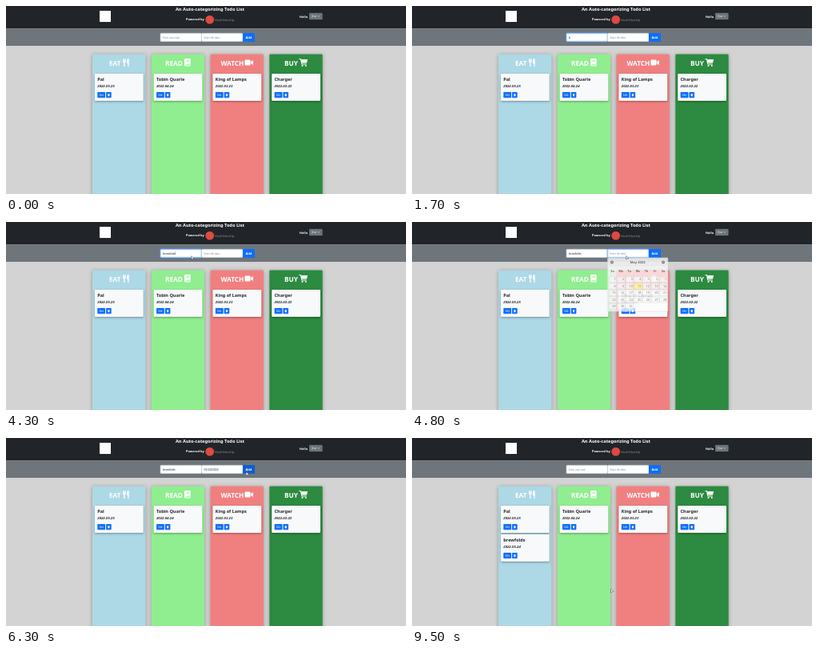
An HTML page with a canvas for the animation above (9900 ms loop, 500 px wide and 236 px high).

```html
<!DOCTYPE html>
<html lang="en">
<head>
<meta charset="utf-8">
<title>Todo list</title>
<style>
html, body { margin: 0; width: 100%; height: 100%; overflow: hidden; background: #d3d3d3; }
canvas { display: block; width: 500px; height: 236px; }
</style>
</head>
<body>
<canvas id="stage"></canvas>
<script>
const W = 500, H = 236, LOOP = 9900;
const FONT = '"Noto Sans", "Open Sans", sans-serif';
const BLUE = '#0d6efd', INK = '#212529';
const canvas = document.getElementById('stage');
const ctx = canvas.getContext('2d');
const ratio = window.devicePixelRatio || 1;
canvas.width = W * ratio;
canvas.height = H * ratio;

const TASK = 'brewfolds';
const KEY_TIMES = [1700, 1900, 2000, 2200, 2700, 2800, 2900, 3400, 3500];
const OPEN = 4550, PICK = 5800, RELOAD = 8600;

const columns = [
  { title: 'EAT', x: 108, tx: 129, color: '#add8e6', icon: utensils, ix: 146, name: 'Pal', date: '2022-05-25' },
  { title: 'READ', x: 181.7, tx: 199, color: '#90ee90', icon: book, ix: 223, name: 'Tobin Quarle', date: '2022-04-24' },
  { title: 'WATCH', x: 255.5, tx: 268.5, color: '#f08080', icon: camera, ix: 298.5, name: 'King of Lamps', date: '2022-03-23' },
  { title: 'BUY', x: 329.3, tx: 348, color: '#2c8b40', icon: cart, ix: 366.5, name: 'Charger', date: '2022-02-22' }
];

// Cursor path: time, x, y
const path = [
  [4300, 232, 43], [4550, 268, 42], [4900, 268, 43], [5450, 276, 98],
  [5850, 276, 98], [6250, 301, 42], [8900, 301, 42], [9500, 249, 190]
];

const clamp = v => Math.max(0, Math.min(1, v));
const ease = v => 0.5 - Math.cos(Math.PI * clamp(v)) / 2;

function rect(x, y, w, h, fill, r = 0, stroke) {
  ctx.beginPath();
  ctx.roundRect(x, y, w, h, r);
  ctx.fillStyle = fill;
  ctx.fill();
  if (stroke) {
    ctx.strokeStyle = stroke;
    ctx.lineWidth = 0.5;
    ctx.stroke();
  }
}

function shadowed(blur, color, dy, draw) {
  ctx.save();
  ctx.shadowBlur = blur * ratio;
  ctx.shadowColor = color;
  ctx.shadowOffsetY = dy * ratio;
  draw();
  ctx.restore();
}

function text(str, x, y, size, color, style = '400', align = 'left') {
  ctx.font = `${style} ${size}px ${FONT}`;
  ctx.fillStyle = color;
  ctx.textAlign = align;
  ctx.fillText(str, x, y);
}

function shape(points, fill) {
  ctx.beginPath();
  points.forEach(([x, y]) => ctx.lineTo(x, y));
  ctx.closePath();
  ctx.fillStyle = fill;
  ctx.fill();
}

function disc(x, y, r, fill) {
  ctx.beginPath();
  ctx.arc(x, y, r, 0, Math.PI * 2);
  ctx.fillStyle = fill;
  ctx.fill();
}

function utensils() {
  for (let i = 0; i < 3; i++) rect(i * 1.4, 0, 0.9, 4, '#fff', 0.4);
  rect(0, 3, 3.7, 1.7, '#fff', 0.8);
  rect(1.2, 4, 1.3, 6, '#fff', 0.5);
  rect(5.2, 0, 2.4, 6.2, '#fff', [2, 0.4, 0, 0.8]);
  rect(6.3, 5, 1.3, 5, '#fff', 0.5);
}

function book(bg) {
  rect(0, 0, 7.6, 9.6, '#fff', 1);
  rect(1.6, 7.3, 5.4, 1.1, bg);
  rect(2.3, 2.2, 3.8, 0.6, bg);
  rect(2.3, 3.6, 3.8, 0.6, bg);
}

function camera() {
  rect(0, 1.4, 7, 7, '#fff', 1);
  shape([[7.4, 4], [10.4, 2], [10.4, 8], [7.4, 6]], '#fff');
}

function cart() {
  shape([[0, 0], [2, 0], [2.4, 1.1], [10.6, 1.1], [9.4, 5.6], [3.5, 5.6],
         [3.7, 6.6], [9.2, 6.6], [9.2, 7.5], [2.9, 7.5], [1.4, 1], [0, 1]], '#fff');
  disc(4, 8.9, 1, '#fff');
  disc(8.3, 8.9, 1, '#fff');
}

function header() {
  rect(0, 0, W, 28.3, INK);
  rect(0, 28.3, W, 21.7, '#6e757b');
  rect(117, 6, 14, 14, '#fff');
  text('An Auto-categorizing Todo List', 255, 6.2, 5.65, '#fff', '700', 'center');
  text('Powered by', 225, 18, 3.95, '#fff', '700');
  disc(254.7, 17.1, 5.4, '#de4a40');
  text('HushHareUp', 261, 18.6, 4, '#8b8e90');
  text('Hello', 367, 14.7, 3.9, '#fff', '700');
  rect(379, 8.8, 16.6, 8.2, '#6c757d', 1);
  text('User', 382, 14, 3.1, '#fff');
  shape([[390, 12.4], [392, 12.4], [391, 13.4]], '#fff');
}

function field(x, value, hint, focused, caret) {
  const draw = () => rect(x, 34.2, 51.3, 10.3, '#fff', 1, focused ? '#86b7fe' : '#ced4da');
  if (focused) shadowed(2.2, '#4c9bff', 0, draw);
  else draw();
  text(value || hint, x + 3, 40.5, value ? 3.4 : 2.95, value ? INK : '#858b90');
  if (focused && caret) rect(x + 3 + (value ? ctx.measureText(value).width : 0), 37.3, 0.35, 4, INK);
}

function form(t) {
  const typed = t < RELOAD ? TASK.slice(0, KEY_TIMES.filter(k => t >= k).length) : '';
  const date = t >= PICK && t < RELOAD ? '05/24/2022' : '';
  const caret = t % 1000 < 500;
  field(193, typed, 'Enter your task', t >= 600 && t < OPEN, caret);
  field(244.6, date, 'Enter the date', t >= OPEN && t < 6300, caret);
  rect(296, 34, 15, 10.7, t >= 6200 && t < 8950 ? '#0b5ed7' : BLUE, [0, 1, 1, 0]);
  text('Add', 303.4, 40.8, 4, '#fff', '700', 'center');
}

function card(x, y, name, date) {
  shadowed(3, 'rgba(0,0,0,.35)', 1, () => rect(x, y, 60.8, 34, '#f8f9fa', 1));
  text(name, x + 3.4, y + 9.2, 5.5, INK, '700');
  text(date, x + 3.4, y + 17.4, 4.25, INK, 'italic 700');
  rect(x + 3.4, y + 23, 9.8, 7.3, BLUE, 0.8);
  text('Edit', x + 8.3, y + 27.6, 2.8, '#fff', '400', 'center');
  rect(x + 14.2, y + 23, 6.6, 7.3, BLUE, 0.8);
  rect(x + 16.2, y + 25, 2.6, 0.5, '#fff');
  rect(x + 16.5, y + 25.8, 2, 2.5, '#fff', 0.3);
}

function column(c) {
  shadowed(5, 'rgba(0,0,0,.3)', 1, () => rect(c.x, 60.6, 66.4, 190, c.color, 1.2));
  text(c.title, c.tx, 74.6, 8.2, '#fff', '700');
  ctx.save();
  ctx.translate(c.ix, 66);
  c.icon(c.color);
  ctx.restore();
  card(c.x + 2.9, 85, c.name, c.date);
}

function arrow(x, dir) {
  disc(x, 50.4, 2, '#444');
  shape([[x + dir, 50.4], [x - dir * 0.6, 49.3], [x - dir * 0.6, 51.5]], '#fff');
}

function calendar(t) {
  const alpha = ease((t - OPEN) / 400) * (1 - ease((t - PICK) / 300));
  if (!alpha) return;
  ctx.save();
  ctx.globalAlpha = alpha;
  rect(244.3, 44.8, 75.7, 67.4, '#fff', 1, '#c5c5c5');
  rect(245.8, 46, 72.6, 9.2, '#e9e9e9', 1, '#ddd');
  text('May 2022', 282, 52, 4.1, '#333', '700', 'center');
  arrow(250, -1);
  arrow(314, 1);
  ['Su', 'Mo', 'Tu', 'We', 'Th', 'Fr', 'Sa'].forEach((d, i) =>
    text(d, 250.6 + i * 10.6, 63, 3.6, '#333', '700', 'center'));
  for (let day = 1; day <= 31; day++) {
    const x = 245.9 + (day - 1) % 7 * 10.6;
    const y = 68.4 + Math.floor((day - 1) / 7) * 8.5;
    const today = day === 11;
    const hover = day === 24 && t >= 5400;
    rect(x, y, 9.7, 7.3, today ? '#fffa90' : hover ? '#ededed' : '#f6f6f6', 0,
      today ? '#dad55e' : '#c5c5c5');
    text(day, x + 8.6, y + 5, 3.6, '#454545', '400', 'right');
  }
  ctx.restore();
}

function cursor(t) {
  const i = path.findIndex(p => p[0] > t);
  if (i === 0) return;
  const [t1, x1, y1] = i < 0 ? path.at(-1) : path[i];
  const [t0, x0, y0] = i < 0 ? path.at(-1) : path[i - 1];
  const k = t1 > t0 ? ease((t - t0) / (t1 - t0)) : 0;
  ctx.save();
  ctx.translate(x0 + (x1 - x0) * k, y0 + (y1 - y0) * k);
  if (t > 5400 && t < 8950) {
    rect(-0.5, 0, 1, 3, '#fff', 0.4, '#333');
    rect(-1.2, 1.9, 3, 2.5, '#fff', 0.7, '#333');
  } else {
    shape([[-0.4, -0.7], [3.2, 3], [1.6, 3.1], [-0.4, 4.5]], '#333');
    shape([[0, 0], [2.4, 2.6], [1.2, 2.7], [0, 3.7]], '#fff');
  }
  ctx.restore();
}

function render(t) {
  ctx.setTransform(ratio, 0, 0, ratio, 0, 0);
  rect(0, 0, W, H, '#d3d3d3');
  header();
  form(t);
  columns.forEach(column);
  if (t >= RELOAD) card(110.9, 121, TASK, '2022-05-24');
  calendar(t);
  cursor(t);
}

const start = performance.now();
function tick() {
  render((performance.now() - start) % LOOP);
  requestAnimationFrame(tick);
}
tick();
</script>
</body>
</html>
```
